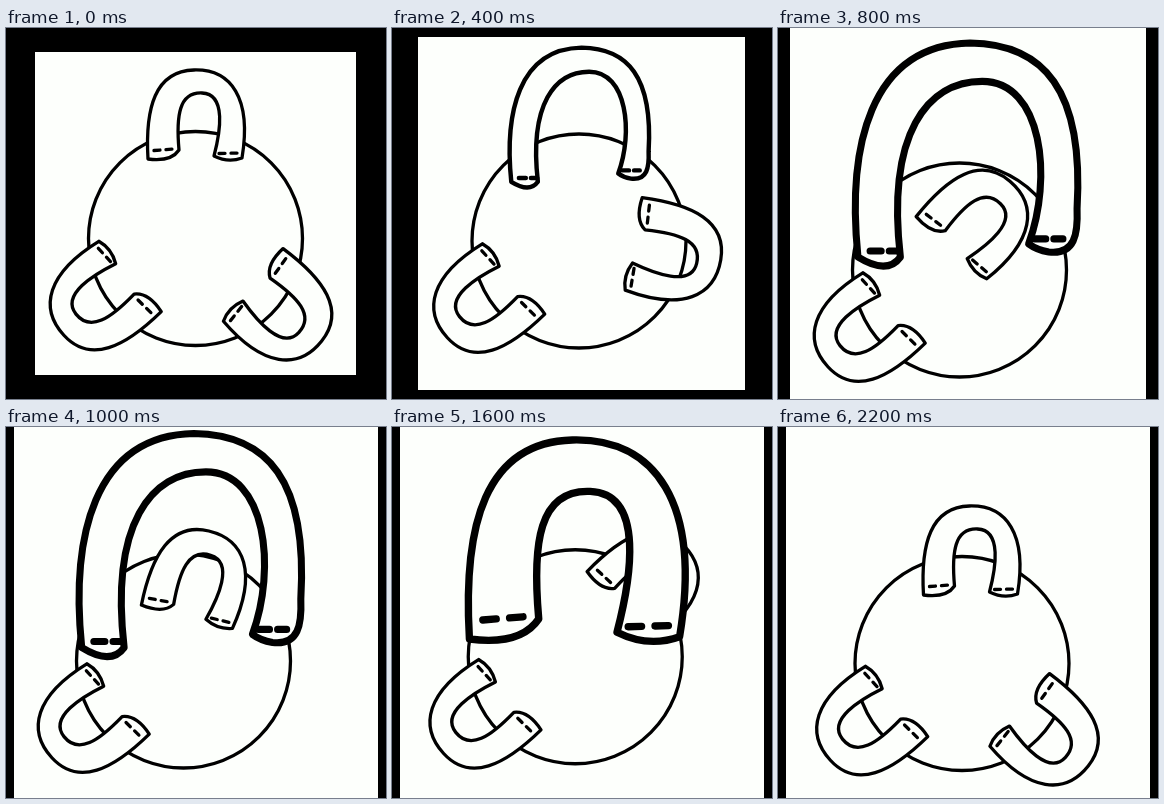
An HTML page for the animation above (2400 ms loop, 380 px wide and 371 px high).

```html
<!DOCTYPE html>
<html lang="en">
<head>
<meta charset="utf-8">
<title>Three handles</title>
<style>
  html, body { margin: 0; width: 100%; height: 100%; overflow: hidden; background: #000; }
  svg { display: block; width: 380px; height: 371px; }
  .ink { fill: #fdfffc; stroke: #000; stroke-linejoin: round; stroke-linecap: round; }
</style>
</head>
<body>
<svg viewBox="0 0 380 371">
  <defs>
    <!-- both handles have their origin midway between the feet -->
    <g id="short" class="ink" stroke-width="3.3">
      <g transform="translate(-190 -130)">
        <path d="M142 131 C139 80 149 43 188 42 C225 41 246 70 236 130 Q222 135 208 128
          C214 105 221 66 196 65 C173 64 170 88 173 122 Q165 134 142 131 Z"/>
        <path d="M148 122.500 L167 121 M213 125.500 L232 125" stroke-dasharray="6 6"/>
      </g>
    </g>
    <g id="long" class="ink" stroke-width="7">
      <g transform="translate(-188 -222)">
        <path d="M81 228 C70 120 92 18 192 16 C265 17 305 62 298 180 C299 205 296 226 270 223 Q258 221 250 215
          C274 150 264 54 204 54 C150 54 109 105 123 228 Q110 246 81 228 Z"/>
        <path d="M93 222 H122 M256 210 H284" stroke-dasharray="11 8"/>
      </g>
    </g>
  </defs>
  <rect id="paper" fill="#fdfffc"/>
  <g id="scene">
    <circle class="ink" r="107" stroke-width="3.3"/>
    <use href="#short" transform="translate(-66.500 37.500) rotate(-131)"/>
    <use id="swing" href="#short"/>
    <use id="grow"/>
  </g>
</svg>
<script>
  const STEP = 200, STEPS = 12, WIDTH = 380, HEIGHT = 371;
  const handleHeight = { short: 89, long: 207 };

  // Key poses, each led by its step; steps between them are interpolated
  const paper = [[0, 321, 323], [1, 321, 352], [2, 327, 353], [3, 327, 371], [4, 356, 371], [5, 364, 371]];
  const disc = [
    [0, 189.5, 210.5], [2, 187, 213], [4, 181.5, 242], [5, 177.5, 234],
    [6, 181.5, 242], [7, 185, 232], [9, 181.5, 227.5], [11, 184, 236.5]
  ];
  // x, y and angle of the handle that swings up and back
  const swing = [
    [0, 57.5, 47.5, 130], [2, 55, 4, 101], [4, -7, -22, 42], [5, 4.5, -44.5, 15],
    [7, 15.5, -74, 15], [9, 74.5, -27, 80], [11, 57.5, 47.5, 130]
  ];
  // x, y and height of the handle that grows and shrinks
  const grow = [
    [0, 0.5, -80.5, 89], [2, 0, -63, 131], [4, 6.5, -19, 209], [6, 6, -20, 209],
    [7, 4.5, -4, 209], [9, -1.5, -36, 189], [10, 5, -43, 120], [11, 9.5, -69.5, 89]
  ];

  function poseAt(keys, step) {
    const next = keys.findIndex(key => key[0] >= step);
    if (next < 0) return keys.at(-1).slice(1);
    const to = keys[next], from = keys[Math.max(next - 1, 0)];
    const p = to === from ? 1 : (step - from[0]) / (to[0] - from[0]);
    return to.map((v, i) => from[i] + (v - from[i]) * p).slice(1);
  }

  const set = (id, attrs) => {
    for (const name in attrs) document.getElementById(id).setAttribute(name, attrs[name]);
  };
  const place = (id, x, y, extra = '') => set(id, { transform: `translate(${x} ${y}) ${extra}` });

  function show(step) {
    const [width, height] = poseAt(paper, step);
    const x = Math.floor((WIDTH - width) / 2), y = Math.floor((HEIGHT - height) / 2);
    set('paper', { x, y, width, height });

    place('scene', ...poseAt(disc, step));

    const [sx, sy, angle] = poseAt(swing, step);
    place('swing', sx, sy, `rotate(${angle})`);

    const [gx, gy, tall] = poseAt(grow, step);
    const kind = step > 0 && step < 8 ? 'long' : 'short';
    set('grow', { href: '#' + kind });
    place('grow', gx, gy, `scale(${tall / handleHeight[kind]})`);
  }

  let shown = -1;
  function tick() {
    const step = Math.floor(performance.now() / STEP) % STEPS;
    if (step !== shown) show(shown = step);
    requestAnimationFrame(tick);
  }
  tick();
</script>
</body>
</html>
```
